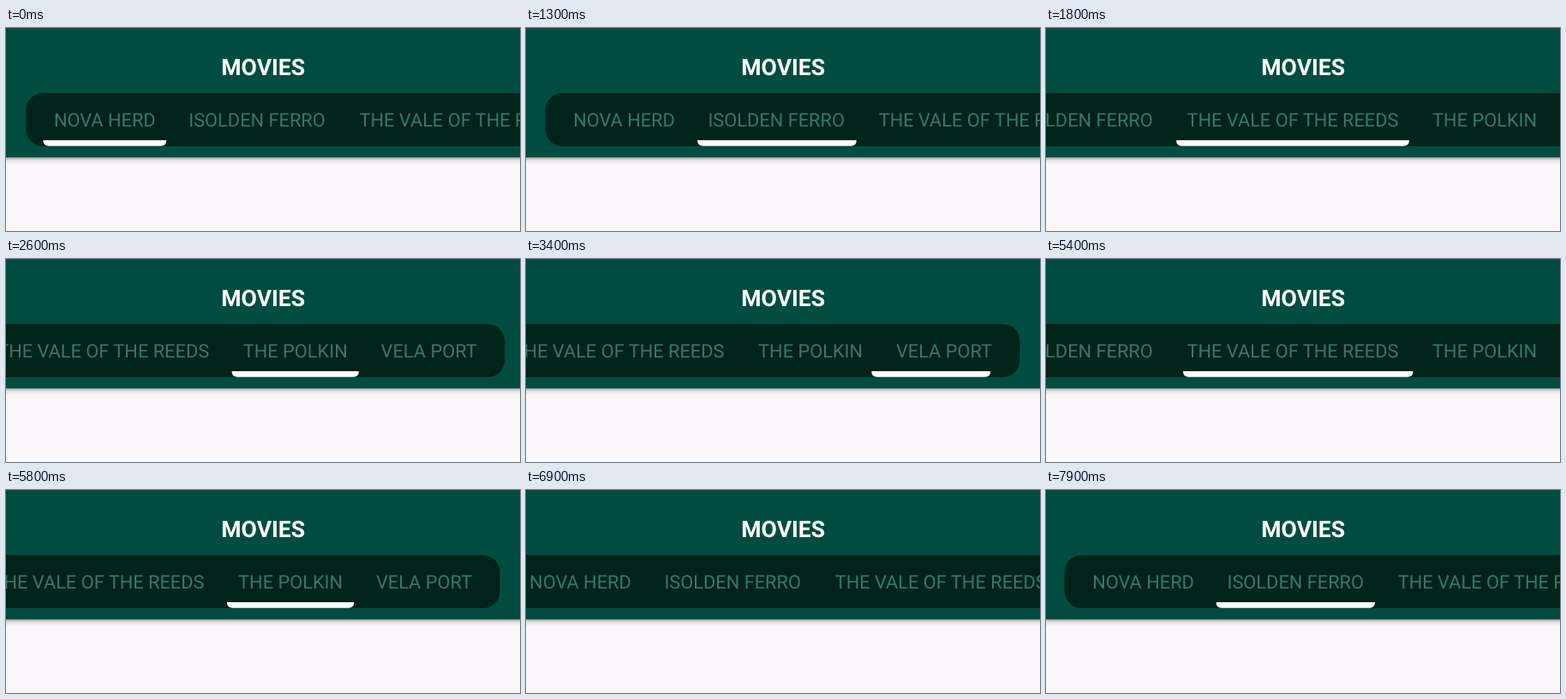
Recreate the animation shown at these times as an HTML page. Size 600 by 237 pixels, loop 8 s.

```html
<!DOCTYPE html>
<html lang="en">
<head>
<meta charset="utf-8">
<title>Movie tabs</title>
<style>
  html, body { margin: 0; width: 100%; height: 100%; overflow: hidden; background: #faf8fb; }
  svg { display: block; }
  text { font-family: Roboto, sans-serif; text-anchor: middle; text-rendering: geometricPrecision; }
  .title { font-size: 26.6px; font-weight: 700; fill: #fff; }
  #tabs text { font-size: 21.8px; fill: #38776a; }
</style>
</head>
<body>
<svg width="600" height="237" viewBox="0 0 600 237">
  <defs>
    <linearGradient id="shadow" x2="0" y2="1">
      <stop offset="0" stop-color="#000" stop-opacity=".36"/>
      <stop offset=".4" stop-color="#000" stop-opacity=".1"/>
      <stop offset="1" stop-color="#000" stop-opacity="0"/>
    </linearGradient>
  </defs>
  <rect width="600" height="237" fill="#faf8fb"/>
  <rect y="151" width="600" height="8" fill="url(#shadow)"/>
  <rect width="600" height="151" fill="#004d40"/>
  <rect width="600" height="1.5" fill="#1c4a45"/>
  <text class="title" x="300.2" y="55.3">MOVIES</text>
  <g id="tabs">
    <rect x="23.3" y="76" width="981.2" height="62" rx="20" fill="#002419"/>
    <path id="indicator" fill="#fff"/>
  </g>
</svg>
<script>
const LOOP = 8000;
const tabs = [
  { label: 'NOVA HERD', center: 115.3, width: 144, scroll: 0 },
  { label: 'ISOLDEN FERRO', center: 293, width: 185.5, scroll: 0.8 },
  { label: 'THE VALE OF THE REEDS', center: 536, width: 272, scroll: 248 },
  { label: 'THE POLKIN', center: 760.1, width: 148.4, scroll: 428 },
  { label: 'VELA PORT', center: 916, width: 138, scroll: 428 },
];
// Taps: [time, tab index]
const taps = [[490, 1], [1290, 2], [2220, 3], [3210, 4], [4190, 2], [5370, 3], [7520, 1]];

// cubic-bezier(.4, 0, .2, 1)
function standardEase(x) {
  let low = 0, high = 1;
  for (let i = 0; i < 24; i++) {
    const u = (low + high) / 2, v = 1 - u;
    if (1.2 * v * v * u + 0.6 * v * u * u + u ** 3 < x) low = u; else high = u;
  }
  return low * low * (3 - 2 * low);
}
const cubicOut = x => 1 - (1 - x) ** 3;

const move = (start, duration, to, ease = standardEase) => ({ start, duration, to, ease });
const valueAt = (time, from, moves) => moves.reduce((value, { start, duration, to, ease }) => {
  if (time <= start) return value;
  return time >= start + duration ? to : value + (to - value) * ease((time - start) / duration);
}, from);

const indicatorMoves = key => taps.map(([time, i]) => move(time, 300, tabs[i][key]));
const centers = indicatorMoves('center');
const widths = indicatorMoves('width');
// The strip scrolls once the indicator has almost arrived; one drag brings it back.
const scrolls = taps.map(([time, i]) => move(time + 210, 220, tabs[i].scroll));
scrolls.splice(-1, 0, move(6560, 550, 30, cubicOut));

const strip = document.getElementById('tabs');
const indicator = document.getElementById('indicator');
for (const { label, center } of tabs) {
  const text = document.createElementNS(strip.namespaceURI, 'text');
  text.setAttribute('x', center);
  text.setAttribute('y', 115.4);
  text.textContent = label;
  strip.insertBefore(text, indicator);
}

function draw(now) {
  const time = now % LOOP;
  const center = valueAt(time, tabs[0].center, centers);
  const half = valueAt(time, tabs[0].width, widths) / 2;
  const left = center - half, right = center + half;
  indicator.setAttribute('d',
    `M${left} 131H${right}q0 6.8-6.8 6.8H${left + 6.8}q-6.8 0-6.8-6.8z`);
  strip.setAttribute('transform', `translate(${-valueAt(time, 0, scrolls)})`);
}

const start = performance.now();
(function tick() {
  draw(performance.now() - start);
  requestAnimationFrame(tick);
})();
</script>
</body>
</html>
```
